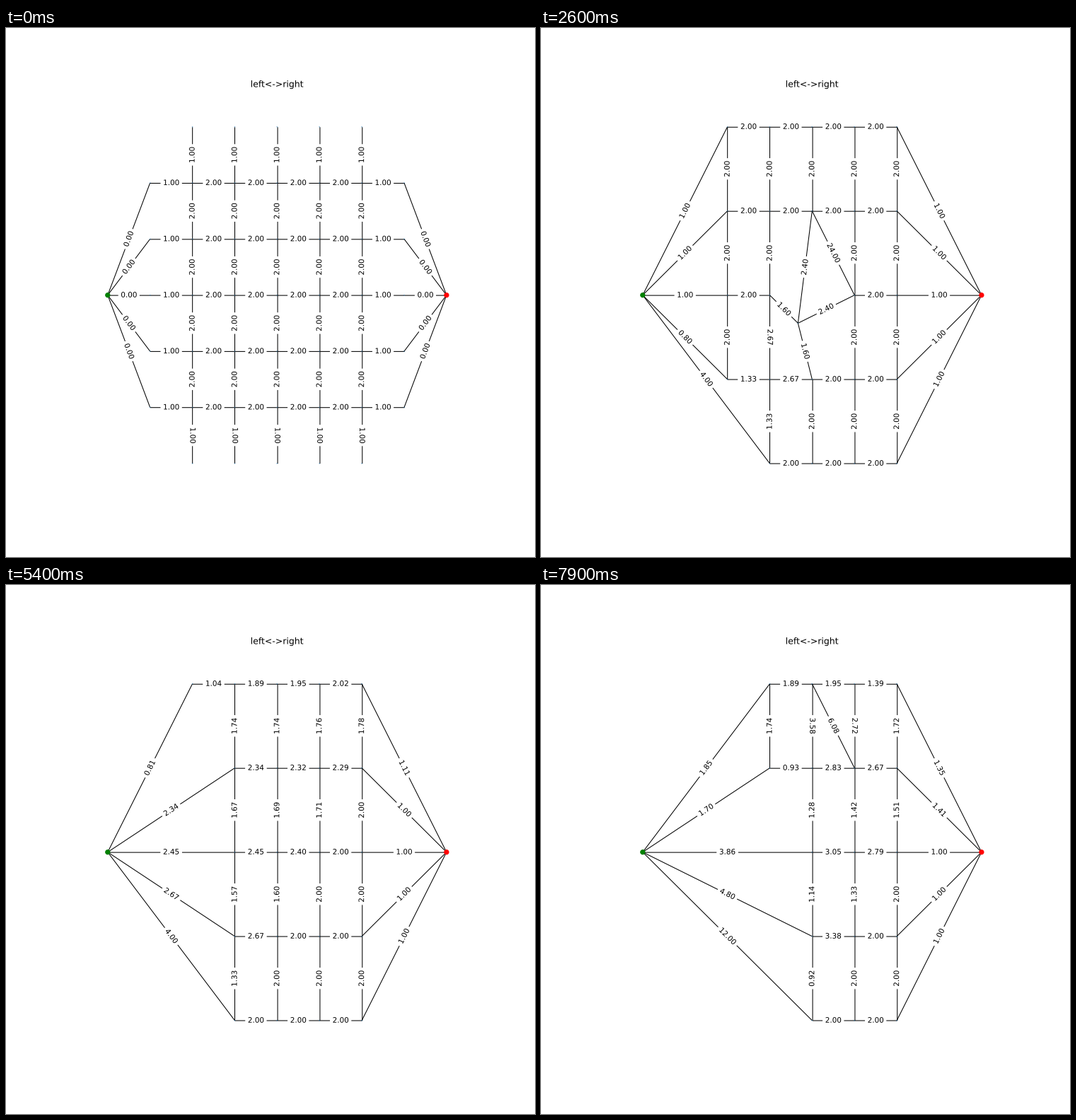
A matplotlib script for the animation above (8 s loop, 748 by 748 pixels).

```python
from itertools import combinations, islice

import matplotlib.pyplot as plt
import numpy as np
from matplotlib.animation import FuncAnimation
from matplotlib.collections import LineCollection
from matplotlib.patheffects import Normal

N = 5                     # cells per side
LO, HI = 2, N + 1         # first and last cell column
LEFT, RIGHT = (0, 3), (8, 3)
FRAMES, INTERVAL = 80, 100
DPI, FINE_DPI = 74.8, 100
OUTLINE = [Normal()]      # draws text as outlines, free of the pixel grid


class Net:
    """Resistor network; every node is keyed by its position."""

    def __init__(self):
        self.adj = {}

    def link(self, u, v, r):
        a, b = self.adj.setdefault(u, {}), self.adj.setdefault(v, {})
        if v in a:
            r = a[v] * r / (a[v] + r)
        a[v] = b[u] = r

    def cut(self, u, v):
        del self.adj[v][u]
        return self.adj[u].pop(v)

    def eliminate(self, u):
        """Remove a dangling node, a series node or the centre of a star."""
        arms = {v: self.cut(u, v) for v in list(self.adj[u])}
        del self.adj[u]
        for v, w in combinations(arms, 2):
            a, b = arms[v], arms[w]
            rest = sum(a * b / r for k, r in arms.items() if k not in (v, w))
            self.link(v, w, a + b + rest)

    def to_star(self, a, b, c):
        """Replace a triangle by a star around its centroid."""
        ab, bc, ca = self.cut(a, b), self.cut(b, c), self.cut(c, a)
        total = ab + bc + ca
        hub = tuple(sum(p) / 3 for p in zip(a, b, c))
        self.link(a, hub, ab * ca / total)
        self.link(b, hub, ab * bc / total)
        self.link(c, hub, bc * ca / total)
        return hub

    def move(self, u, new):
        for v in list(self.adj[u]):
            self.link(v, new, self.cut(u, v))
        del self.adj[u]

    def snapshot(self):
        seen, edges = set(), []
        for u, arms in self.adj.items():
            edges += [(u, v, r) for v, r in arms.items() if v not in seen]
            seen.add(u)
        return list(self.adj), edges


def build():
    net = Net()
    cols, rows = range(LO, HI + 1), range(1, N + 1)
    for x in cols:
        for y in rows:
            net.adj[x, y] = {}
    for x in cols:
        for y in rows:
            if x < HI:
                net.link((x, y), (x + 1, y), 2)
            if y < N:
                net.link((x, y), (x, y + 1), 2)
    for x in cols:
        net.link((x, 1), (x, 0), 1)
        net.link((x, N), (x, N + 1), 1)
    for y in rows:
        net.link((LO, y), (LO - 1, y), 1)
        net.link((HI, y), (HI + 1, y), 1)
        net.link((LO - 1, y), LEFT, 0)
        net.link((HI + 1, y), RIGHT, 0)
    return net


def reduction():
    net = build()
    yield net.snapshot()

    loose = [(x, y) for x in range(LO, HI + 1) for y in (0, N + 1)]
    series = [(x, y) for x in (LO - 1, HI + 1) for y in range(1, N + 1)]
    for node in loose + series:
        net.eliminate(node)
        yield net.snapshot()

    for x in range(LO, HI + 1):
        for y in range(1, N + 1):
            net.eliminate((x, y))
            yield net.snapshot()
            # push the new diagonal up and right until it leaves the grid
            bx, by = x + 1, y + 1
            while bx <= HI and by <= N:
                hub = net.to_star((bx - 1, by), (bx, by), (bx, by - 1))
                yield net.snapshot()
                net.eliminate((bx, by))
                yield net.snapshot()
                net.move(hub, (bx, by))
                yield net.snapshot()
                bx, by = bx + 1, by + 1


def padded(values):
    mid = (min(values) + max(values)) / 2
    half = (max(values) - min(values)) / 2 * 1.1 ** 2
    return mid - half, mid + half


def segment(u, v):
    """Edge in data units; level and upright ones sit on the finer grid."""
    if u[0] != v[0] and u[1] != v[1]:
        return u, v
    scale = FINE_DPI / DPI
    x, y = (ax.transData.transform([u, v]) * scale).T
    x = np.floor(x + 0.5 + 1e-6) + 0.5
    y = np.ceil(y - 0.5 - 1e-6) - 0.5
    return ax.transData.inverted().transform(np.column_stack([x, y]) / scale)


def label(u, v, r):
    (x0, y0), (x1, y1) = ax.transData.transform([u, v])
    angle = np.degrees(np.arctan2(y1 - y0, x1 - x0))
    if angle > 90:
        angle -= 180
    elif angle < -90:
        angle += 180
    ax.text((u[0] + v[0]) / 2, (u[1] + v[1]) / 2, f"{r:.2f}", size=10,
            rotation=angle, ha="center", va="center", zorder=1,
            path_effects=OUTLINE,
            bbox=dict(boxstyle="round", ec="white", fc="white"))


def draw(i):
    nodes, edges = states[i]
    ax.clear()
    ax.axis("off")
    ax.set_title("left<->right", path_effects=OUTLINE)
    xs, ys = zip(*nodes)
    ax.set_xlim(padded(xs))
    ax.set_ylim(padded(ys))
    ax.add_collection(LineCollection([segment(u, v) for u, v, _ in edges],
                                     colors="black", linewidths=1, zorder=1,
                                     snap=False), autolim=False)
    for edge in edges:
        label(*edge)
    special = {LEFT: "green", RIGHT: "red"}
    ax.scatter(xs, ys, s=[36 if n in special else 0.1 for n in nodes],
               c=[special.get(n, "tab:blue") for n in nodes], zorder=2)
    return []


states = list(islice(reduction(), FRAMES))
fig, ax = plt.subplots(figsize=(10, 10), dpi=DPI)
anim = FuncAnimation(fig, draw, frames=FRAMES, interval=INTERVAL,
                     init_func=lambda: [], repeat=True, repeat_delay=0)
plt.show()
```
